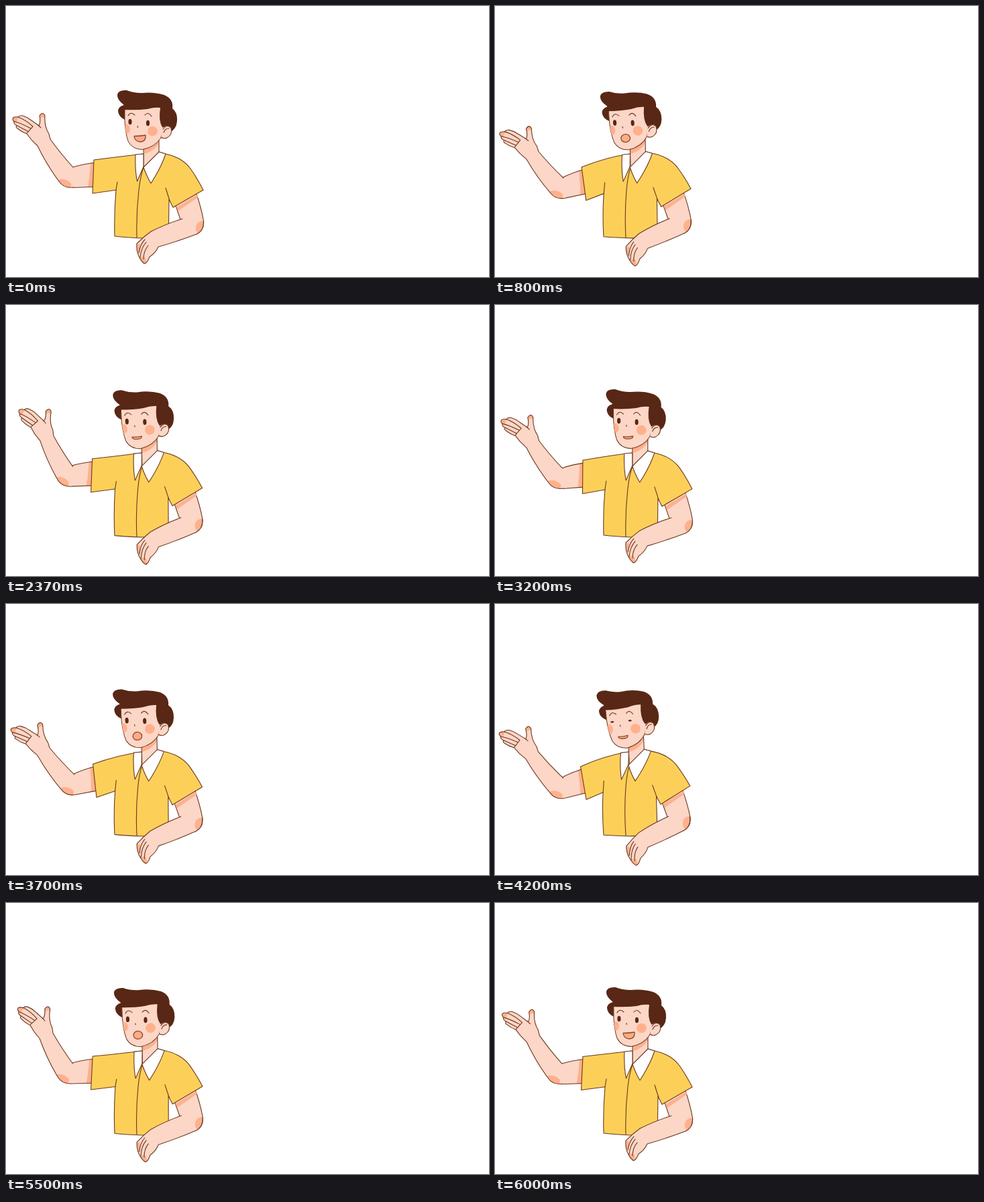
Recreate the animation shown at these times as an HTML page. Size 720 px wide and 405 px high, loop 6.06 s.

```html
<!DOCTYPE html>
<html lang="en">
<head>
<meta charset="utf-8">
<title>Talking presenter</title>
<style>
  html, body { margin: 0; width: 100%; height: 100%; overflow: hidden; background: #fff; }
  svg { display: block; width: 100vw; height: 100vh; }
  .line { fill: none; }
  .skin { fill: #fcd6c6; }
  .shirt { fill: #fcd058; }
  .white { fill: #fff; }
  .hair { fill: #592715; }
  .blush { fill: #ffb08c; stroke: none; }
  .fill { stroke: none; }
  .mouth { fill: #fcab85; stroke: #8f4a2c; stroke-width: 1.3; }
</style>
</head>
<body>
<svg viewBox="0 0 720 405" stroke="#6b3820" stroke-width="1.1" stroke-linejoin="round" stroke-linecap="round">
  <defs>
    <path id="facePath" d="M177 146L177 172Q178 190 182 202Q188 214 203 214.500Q222 211 231 197L236 180L236 146Z"/>
    <clipPath id="faceClip"><use href="#facePath"/></clipPath>
    <path id="handPath" d="M101 271Q86 273 79 262Q61 238 47 209L38 200L31 191Q23 188 17 183Q14 181 16 178.500Q11 176 12 172.500Q9 170 10.500 167Q13 165 18 166Q20 163 25 164Q32 166 38 171L49 179Q52 174 50 164Q55 157 58 164Q57 180 64 191L66 199Q81 220 100 241"/>
  </defs>
  <g id="torso">
    <g id="leftArm">
      <path class="skin fill" d="M140 231L99 241L92 256L100 271L140 271Z"/>
      <path class="blush" d="M126 235.500L140 232L140 271L122 271Q125 254 126 235.500Z"/>
      <path class="line" d="M134 234Q115 236 99 241M134 270L100 271.500"/>
      <g id="leftFore">
        <path class="skin fill" d="M100 241L110 256L101 271L79 262Z"/>
        <use href="#handPath" class="skin fill"/>
        <path class="blush" d="M78 260Q88 256 97 265Q98 269 95 271.500Q84 270 78 260Z"/>
        <path class="blush" d="M12 173Q8 168 13 166L19 166.500Q16 170 16 175Z"/>
        <path class="blush" d="M50.500 170Q49 159 55 160Q59 161 58 168Q54 163 50.500 170Z"/>
        <use href="#handPath" class="line"/>
        <path class="line" d="M31 190L40 180M18 166Q29 170 40 180M12 172.500Q22 175 37 183M16 178.500L33 187.500M48 178L52 182"/>
      </g>
    </g>
    <g id="rightArm">
      <path class="skin" d="M250 290L260 319L262 335L284 341Q296 335 294.500 321Q291 301 283 278Z"/>
      <path class="blush" d="M254 301L285 282L286 286Q273 295 257 306Z"/>
    </g>
    <path id="shirt" class="shirt"/>
    <path id="armpit" class="line"/>
    <path class="line" d="M238 272L244 291M205 241Q200 256 198 275Q194 310 195 346"/>
    <path class="skin fill" d="M205 207L228 198L228 218L205 241Z"/>
    <path class="blush" d="M205 214Q220 211 228 201L228 205Q221 217 206 221Z"/>
    <path class="line" d="M205 211L205 241M228 200L228 218"/>
    <g id="collar">
      <path class="white" d="M193 222L205 221L205 240L195.500 262Q192 245 193 222Z"/>
      <path class="white" d="M205 241L228 218L238 221Q231 242 216 265Q210 255 205 241Z"/>
    </g>
    <g id="rightForeHolder">
      <g id="rightFore">
        <path class="skin fill" d="M263 318L277 316L294.500 322Q295 336 284 341Q255 352 227 360Q223 369 214 375Q210 385 206 385Q201 381 199 376Q194 367 195 355Q205 345 216 337Q240 325 263 318Z"/>
        <path class="blush" d="M294 321Q296 332 286 340Q280 333 285 325Q289 321 294 321Z"/>
        <path class="blush" d="M195.500 356Q199 354 200 358L198 370Q194 364 195.500 356ZM200 377L204 374L208 377L209 384Q203 387 200 377Z"/>
        <path class="line" d="M294.500 322Q295 336 284 341Q255 352 227 360Q223 369 214 375Q210 385 206 385Q201 381 199 376Q194 367 195 355Q205 345 216 337Q240 325 263 318M207 349Q200 356 198 369M209 353Q201 362 200 376M212 358Q205 366 205 378"/>
      </g>
    </g>
    <g id="head">
      <path class="hair" stroke="none" d="M177 152L177 170Q167 165 167 156Q168 150 176 148Q165 140 166 132Q168 125 180 126Q190 130 202 130Q221 128 236 133Q250 139 248 153Q256 159 255 172Q254 184 245 188L233 184Z"/>
      <use href="#facePath" class="skin" stroke-width="1"/>
      <path class="hair" stroke="none" d="M175 155Q196 156 211 154Q221 151 230 152Q227 172 233 181L244 188L250 160L244 142L176 144Z"/>
      <path class="skin fill" d="M231 198L233 183Q240 176 246 182Q249 192 240 197Q236 198 231 198Z"/>
      <path class="line" d="M234 184Q240 176 246 182Q249 192 240 197Q235 199 231 196M235 189Q237 183 243 183"/>
      <g clip-path="url(#faceClip)"><ellipse class="blush" cx="180" cy="184" rx="5" ry="7"/></g>
      <circle class="blush" cx="218.500" cy="187" r="7.300"/>
      <g id="eyes" class="hair" stroke="none">
        <ellipse cx="185" cy="173" rx="2.600" ry="4.300"/>
        <ellipse cx="211.500" cy="175" rx="2.600" ry="4.300"/>
      </g>
      <path class="line" d="M182 164Q186 157 192 163M207 163Q212 157 217 165M196 179.500L196.500 181.500"/>
      <g class="mouth">
        <path data-mouth="open" d="M191 194.500Q200 194.500 208 193Q209 203 199.500 203Q192 202 191 194.500Z"/>
        <ellipse data-mouth="round" cx="199.500" cy="197" rx="6.800" ry="6"/>
        <ellipse data-mouth="oval" cx="199" cy="197.500" rx="7" ry="3.600" transform="rotate(4 199 197.500)"/>
        <path data-mouth="flat" d="M191.500 196.500Q199 197.500 206 196Q206 200 200 200Q192 200.500 191.500 196.500Z"/>
        <path data-mouth="thin" d="M191.500 198Q199 195.500 205.500 198Q200 200.500 191.500 198Z"/>
      </g>
    </g>
  </g>
</svg>
<script>
const CYCLE = 3030;
const SHOULDER = [195, 228];
const $ = id => document.getElementById(id);
const wave = (t, peak) => Math.cos(2 * Math.PI * (t - peak) / CYCLE);

// Forearm angle in degrees, evenly spaced over a cycle.
const FORE = [0, -2.3, -3.8, -4.2, 0.4, 7.3, 8, 4];
// Each mouth holds until the given time.
const MOUTHS = [[100, 'open'], [330, 'flat'], [600, 'open'], [980, 'round'], [1350, 'flat'],
  [1780, 'oval'], [2150, 'thin'], [2400, 'flat'], [2700, 'round'], [CYCLE, 'open']];
const mouths = [...document.querySelectorAll('[data-mouth]')];

function spline(values, phase) {
  const n = values.length, pos = phase * n, i = Math.floor(pos), u = pos - i;
  const [a, b, c, d] = [-1, 0, 1, 2].map(k => values[(i + k + n) % n]);
  return b + u / 2 * (c - a + u * (2 * a - 5 * b + 4 * c - d + u * (3 * (b - c) + d - a)));
}

function turn(id, [x, y], angle, skew = 0) {
  $(id).setAttribute('transform',
    `translate(${x} ${y}) rotate(${angle.toFixed(3)}) skewX(${skew.toFixed(3)}) translate(${-x} ${-y})`);
}

function swing(x, y, angle) {
  const r = angle * Math.PI / 180, c = Math.cos(r), s = Math.sin(r);
  const dx = x - SHOULDER[0], dy = y - SHOULDER[1];
  return `${(SHOULDER[0] + dx * c - dy * s).toFixed(2)} ${(SHOULDER[1] + dx * s + dy * c).toFixed(2)}`;
}

function draw(t) {
  const lean = (1 - wave(t, 0)) / 2;
  const upper = -4.9 - 6.5 * wave(t, 1170);
  const arm = upper + 2.2 * lean;

  turn('torso', [200, 346], -2.2 * lean, 0.7 * lean);
  turn('head', [212, 215], -4.3 * lean);
  turn('collar', [205, 221], 0, -5 * lean);
  turn('leftArm', SHOULDER, arm);
  turn('leftFore', [95, 257], spline(FORE, t / CYCLE) - upper);
  turn('rightArm', [262, 240], 1.9 * lean);
  turn('rightForeHolder', [262, 240], 1.9 * lean);
  turn('rightFore', [277, 328], -7.2 * lean);

  const pitY = (275 - 0.55 * arm).toFixed(2);
  $('shirt').setAttribute('d', `M${swing(131, 230, arm)}Q170 225 205 221L228 218L238 221
    Q262 226 275 243Q286 259 294 275L249 301L243 289L242.500 325L240 346L204 347
    Q180 346 162 344Q161 310 164 ${pitY}L${swing(129, 280, arm)}Z`);
  $('armpit').setAttribute('d', `M164 ${pitY}L166 263`);

  const blink = Math.max(0.3, Math.min(1, (Math.abs(t - 1170) - 40) / 60));
  $('eyes').setAttribute('transform', `translate(0 ${174 * (1 - blink)}) scale(1 ${blink})`);
  const mouth = MOUTHS.find(m => t < m[0])[1];
  for (const m of mouths) m.style.display = m.dataset.mouth === mouth ? '' : 'none';
}

const start = performance.now();
function tick() {
  draw((performance.now() - start) % CYCLE);
  requestAnimationFrame(tick);
}
tick();
</script>
</body>
</html>
```
